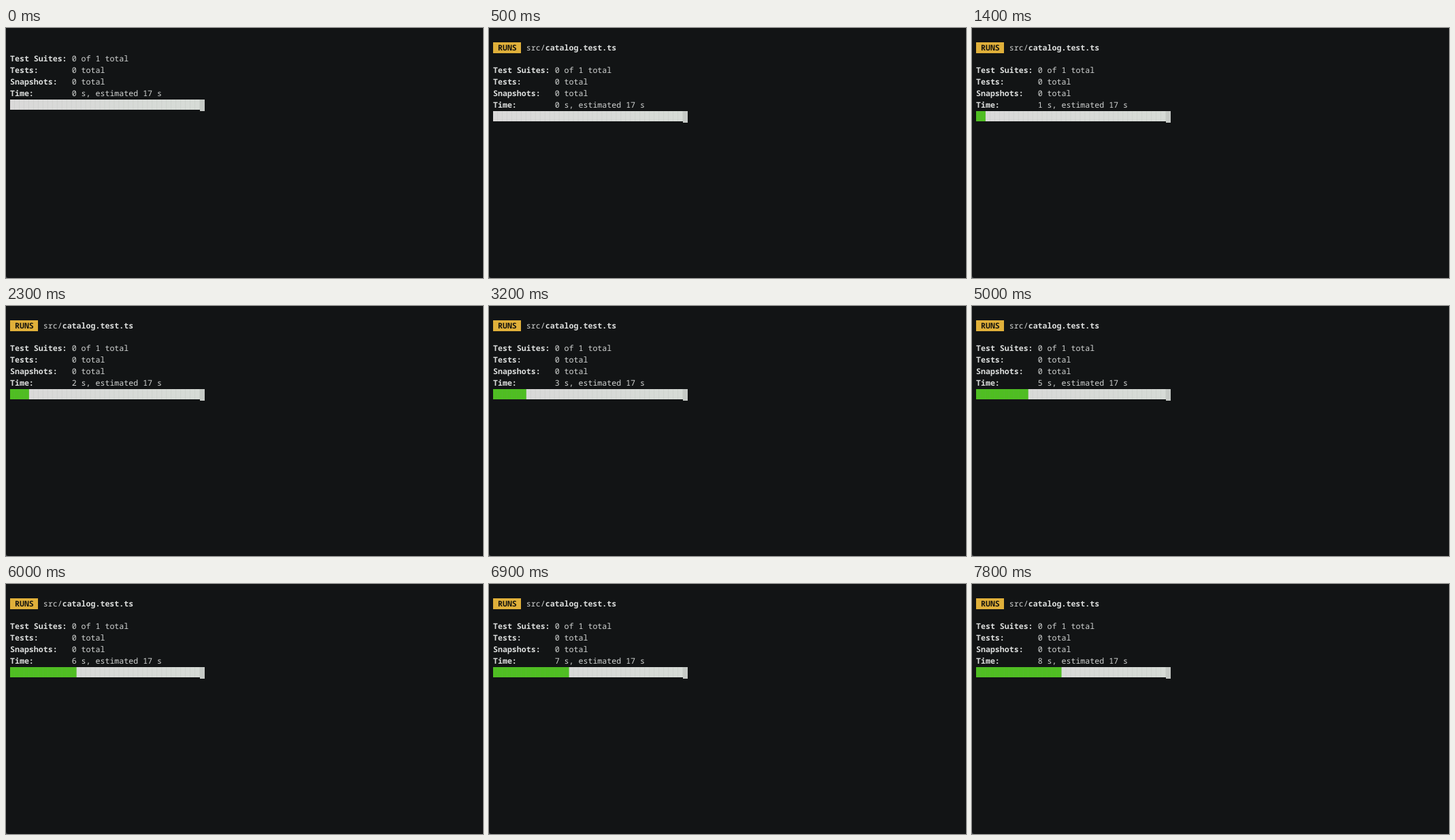
An HTML page for the animation above (8 s loop, 701 by 367 pixels).

```html
<!DOCTYPE html>
<html lang="en">
<head>
<meta charset="utf-8">
<title>Test run</title>
<style>
  html, body { margin: 0; width: 100%; height: 100%; overflow: hidden; background: #121415; }
  svg { display: block; width: 701px; height: 367px; }
  text {
    font: 11.625px "Noto Sans Mono", "DejaVu Sans Mono", monospace;
    fill: #d2d4d3;
    white-space: pre;
    text-rendering: geometricPrecision;
  }
  .b { font-weight: 700; fill: #dcdedd; }
</style>
</head>
<body>
<svg viewBox="0 0 701 367">
  <defs>
    <linearGradient id="pale">
      <stop offset="0" stop-color="#dad9d9"/>
      <stop offset="1" stop-color="#d6dbd6"/>
    </linearGradient>
    <pattern id="seams" x="6" width="6.975" height="15" patternUnits="userSpaceOnUse">
      <rect x="6" width="1" height="15" fill="#808c80" opacity=".1"/>
    </pattern>
  </defs>
  <path d="M0 363Q0 367 4 367H0z" fill="#43464a"/>
  <g id="runs">
    <rect x="6" y="21" width="41" height="16" fill="#e0b03a"/>
    <text class="b" x="12.975" y="33" style="fill:#17150f">RUNS</text>
    <text x="54.825" y="33">src/<tspan class="b">catalog.test.ts</tspan></text>
  </g>
  <g id="summary">
    <text class="b" x="6" y="66">Test Suites:</text><text x="96.675" y="66">0 of 1 total</text>
    <text class="b" x="6" y="83">Tests:</text><text x="96.675" y="83">0 total</text>
    <text class="b" x="6" y="100">Snapshots:</text><text x="96.675" y="100">0 total</text>
    <text class="b" x="6" y="117">Time:</text><text id="time" x="96.675" y="117">0 s, estimated 17 s</text>
    <rect x="6" y="122" width="279" height="15" fill="url(#pale)"/>
    <rect id="done" x="6" y="122" width="0" height="15" fill="#4fbe22"/>
    <rect x="6" y="122" width="279" height="15" fill="url(#seams)"/>
    <rect x="285" y="122" width="7" height="17" fill="#c6cac6"/>
  </g>
</svg>
<script>
  const LOOP = 8000, CELL = 6.975, CELLS = 40, ESTIMATE = 17;
  const ticks = [1400, 2300, 3200, 4100, 5000, 6000, 6900, 7800];
  const $ = id => document.getElementById(id);
  const start = performance.now();

  function draw(now) {
    const t = Math.max(0, now - start) % LOOP;
    const started = t >= 500;
    const secs = ticks.filter(at => t >= at).length;
    $('runs').setAttribute('visibility', started ? 'visible' : 'hidden');
    $('summary').setAttribute('transform', `translate(0 ${started ? 0 : -17})`);
    $('time').textContent = `${secs} s, estimated ${ESTIMATE} s`;
    $('done').setAttribute('width', Math.floor(CELLS * secs / ESTIMATE) * CELL);
    requestAnimationFrame(draw);
  }
  draw(start);
</script>
</body>
</html>
```
